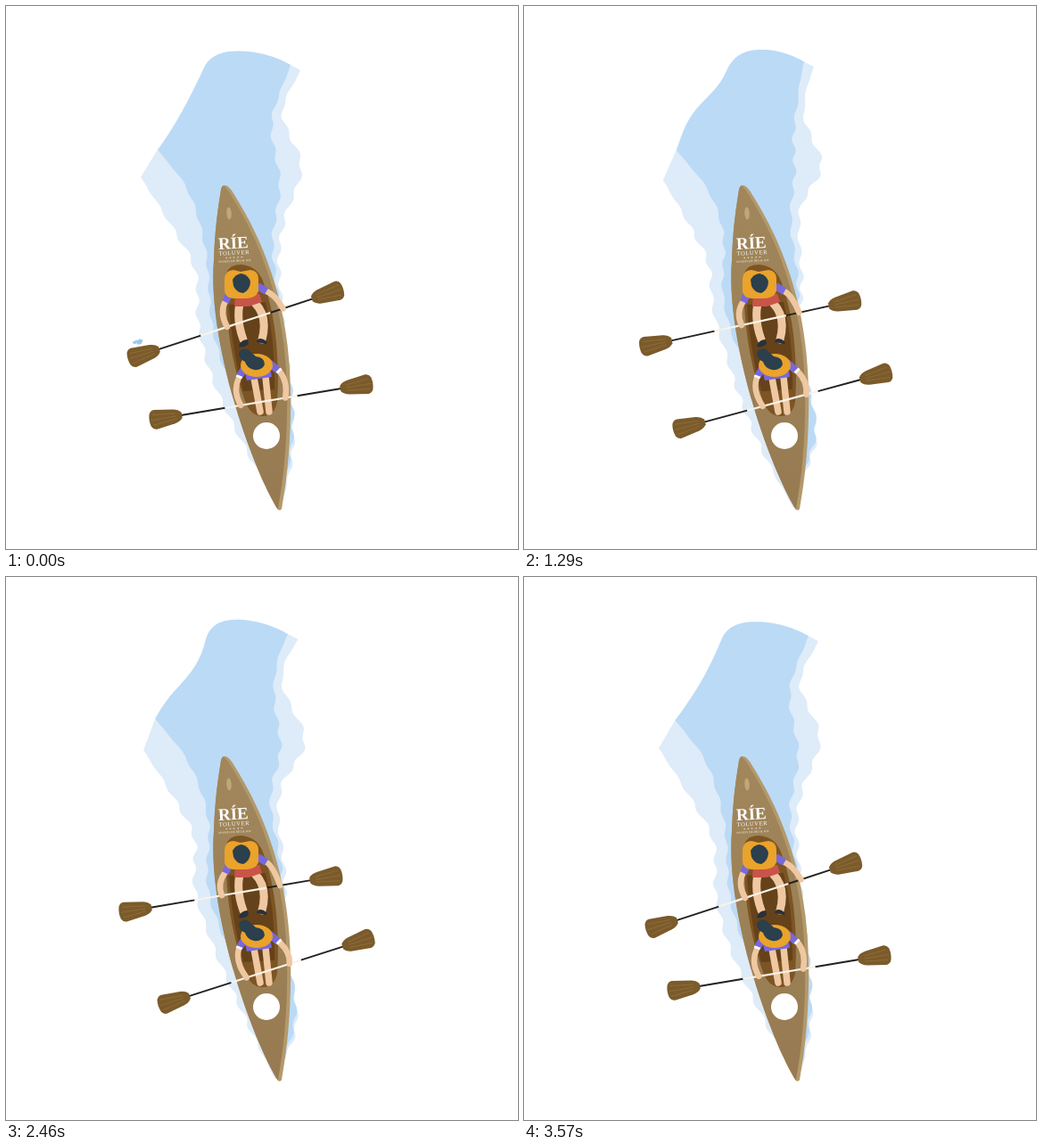
Animation, 574 px wide and 609 px high, one loop 3.6 s. Source, as an HTML page:

```html
<!DOCTYPE html>
<html lang="es">
<head>
<meta charset="utf-8">
<title>Kayak</title>
<style>
html, body { margin: 0; width: 100%; height: 100%; overflow: hidden; background: #fff; }
svg { display: block; width: 574px; height: 609px; }
.skin { fill: none; stroke: #efc8a2; stroke-linecap: round; }
.sleeve { fill: none; stroke: #7868de; stroke-width: 8; }
.cuff { fill: none; stroke: #fff; stroke-width: 7; }
.vest { fill: #eaa32b; }
.hair { fill: #2b3f4c; }
.logo { fill: #fff; text-anchor: middle; font-family: "Liberation Serif", serif; }
.grain { fill: none; stroke: #8d6c39; stroke-width: 1; }
</style>
</head>
<body>
<svg viewBox="0 0 574 609">
  <defs>
    <linearGradient id="wood" x1="0" y1="0" x2="0" y2="1">
      <stop offset="0" stop-color="#a1875b"/>
      <stop offset="1" stop-color="#977a51"/>
    </linearGradient>
    <path id="hull" d="M245 201Q249 201 253 207C300 280 322 360 319 460C318 505 314 535 309 564Q306 568 303 562C270 505 226 370 233 285C234 250 238 225 241 206Q242 201 245 201Z"/>
    <clipPath id="inside"><use href="#hull"/></clipPath>
    <g id="blade">
      <path d="M90-3Q93-7 99-8L120-11Q124-11 126-7Q128 0 126 7Q124 11 120 11L99 8Q93 7 90 3Z" fill="#7b5b2b"/>
      <path class="grain" d="M97-3L123-6M97 0H125M97 3L123 6"/>
    </g>
    <g id="paddle">
      <path d="M-91 0H-41M41 0H91" stroke="#23211f" stroke-width="1.900"/>
      <path d="M-41 0H41" stroke="#f8f2ea" stroke-width="2.200"/>
      <use href="#blade"/>
      <use href="#blade" transform="scale(-1 1)"/>
    </g>
  </defs>

  <path id="foam" fill="#deebf8"/>
  <path id="water" fill="#bbdaf6"/>
  <g id="splashes" fill="#9cc8ee"></g>

  <use href="#hull" fill="#b3996b"/>
  <g clip-path="url(#inside)"><use href="#hull" x="-4" fill="url(#wood)"/></g>
  <ellipse cx="250" cy="232.500" rx="2.700" ry="7" transform="rotate(-4 250 232)" fill="#bea878"/>

  <path d="M246 304Q248 290 263 290Q280 291 287 306C303 345 307 400 304 444Q301 460 288 460Q274 460 268 443C252 400 246 350 246 304Z" fill="#7d5423"/>
  <path d="M250 335L291 332Q302 375 301 430L266 432Q254 390 250 335Z" fill="#65421a"/>

  <g class="logo" transform="rotate(-3 255 270)">
    <text x="255" y="272" font-size="19" font-weight="bold">RÍE</text>
    <text x="255.500" y="279" font-size="6.500" letter-spacing=".6">TOLUVER</text>
    <text x="256" y="284.500" font-size="5" letter-spacing="1.800">*****</text>
    <text x="256" y="287" font-size="3.200" letter-spacing=".2">PASEOS DE RÍO &amp; SOL</text>
  </g>
  <circle cx="292" cy="482" r="15" fill="#fff"/>

  <g class="skin" stroke-width="7.500">
    <path d="M262 334Q258 352 266 374M279 333Q294 348 287 374" stroke-width="9"/>
    <path d="M278 417L285 455M291 416L295 455"/>
  </g>
  <path d="M261 382Q263 374 271 374L272 379Q266 384 261 382ZM281 377Q282 371 289 374Q294 377 292 379Z" fill="#29313c"/>
  <path d="M257 324L284 323L287 332L272 337L256 337Z" fill="#c9544a"/>
  <path d="M268 412L297 410L298 416L270 420Z" fill="#7868de"/>

  <use id="front" href="#paddle"/>
  <use id="rear" href="#paddle"/>
  <g id="arms" class="skin" stroke-width="6.500"></g>

  <path class="sleeve" d="M251 321L246 332M282 314L292 320"/>
  <path class="vest" d="M245 306Q246 296 255 296L263 298L274 296Q283 297 283 306V320Q280 328 268 328H255Q246 327 245 320Z"/>
  <path class="hair" d="M254 307Q257 301 264 300Q272 302 274 309Q274 318 266 322Q258 321 255 314Z"/>

  <path class="sleeve" d="M268 405L262 415M295 400L305 409"/>
  <path class="cuff" d="M262 414.500L261 417M305 408L307 410"/>
  <ellipse class="vest" cx="281" cy="403" rx="18" ry="13"/>
  <path class="hair" d="M261 389Q264 383 271 385L280 393Q290 394 290 402Q287 409 278 408Q270 406 268 399Q261 396 261 389Z"/>
</svg>
<script>
const $ = id => document.getElementById(id);
const { sin, cos, min, max, PI, hypot } = Math;
const TAU = PI * 2, LOOP = 3600, STROKE = 1800, RIPPLE = 900;
const WAVE = { x: -1.6, y: 2.2, size: 3.2 }; // degrees of lag per pixel

function make(parent, tag) {
  const el = document.createElementNS('http://www.w3.org/2000/svg', tag);
  return $(parent).appendChild(el);
}
const fmt = p => p[0].toFixed(2) + ' ' + p[1].toFixed(2);

// Smooth edge through keys [x, y] running downwards, with scallops across it.
function bank(keys, amp, phase) {
  const at = i => keys[max(0, min(keys.length - 1, i))];
  const slope = i => (at(i + 1)[0] - at(i - 1)[0]) / (at(i + 1)[1] - at(i - 1)[1]);
  const top = keys[0][1], bottom = at(keys.length)[1], points = [];
  for (let i = 0; i < keys.length - 1; i++) {
    const [x0, y0] = keys[i], [x1, y1] = keys[i + 1], h = y1 - y0;
    for (let y = y0; y < y1; y += 3) {
      const u = (y - y0) / h, v = 1 - u;
      const x = v * v * (1 + 2 * u) * x0 + u * u * (1 + 2 * v) * x1
        + h * u * v * (v * slope(i) - u * slope(i + 1));
      const fade = min(1, (y - top) / 60, (bottom - y) / 60);
      points.push([x + amp * fade * sin(TAU * y / 27 + phase), y]);
    }
  }
  return [...points, at(keys.length)];
}

function quad(a, c, b) {
  return Array.from({ length: 16 }, (_, i) => {
    const u = i / 15, v = 1 - u;
    return [0, 1].map(k => v * v * a[k] + 2 * u * v * c[k] + u * u * b[k]);
  });
}

const corner = [170, 161], shoulder = [222, 69], crest = [262, 50.5], stern = [319, 66];
const bow = [309, 563];
const foam = [
  corner,
  ...bank([[151, 192], [185, 246], [212, 296], [216, 360], [237, 432], [305, 565]], 2.2, 0),
  ...bank([[330, 72], [310, 120], [331, 180], [312, 240], [306, 290], [322, 490], bow], 2.2, 1).reverse(),
  stern
];
const water = [
  ...quad(corner, [195, 128], shoulder),
  ...quad(shoulder, [231, 50], crest),
  ...quad(crest, [292, 51], stern),
  ...bank([stern, [298, 130], [307, 200], [299, 270], [322, 460], bow], 1.8, 2),
  ...bank([corner, [203, 205], [223, 270], [236, 380], bow], 1.4, 0).reverse()
];

// Travelling wave that shears the water across its direction.
function warp([x, y], t) {
  const lag = (WAVE.y * (y - 72) + WAVE.x * (x - 327)) * PI / 180;
  const d = WAVE.size * (cos(TAU * t / RIPPLE - lag) - cos(lag)) / hypot(WAVE.x, WAVE.y);
  return [x + d * WAVE.y, y - d * WAVE.x];
}
const outline = (points, t) => 'M' + points.map(p => fmt(warp(p, t))).join('L') + 'Z';

// Centre, its drift, tilt and swing; each arm has a shoulder, an elbow and a grip along the shaft.
const oars = [
  { el: $('front'), x: 254.2, y: 356, dx: 3.2, dy: 0.8, tilt: -13.2, swing: -5,
    arms: [[[246, 331], [239, 344], -10], [[292, 320], [302, 324], 56]] },
  { el: $('rear'), x: 289.3, y: 443, dx: -3.3, dy: 1, tilt: -14.4, swing: 4.9,
    arms: [[[261, 417], [254, 432], -23], [[307, 410], [316, 421], 27.5]] }
];
oars.forEach(o => o.arms.forEach(a => a.push(make('arms', 'path'))));

function row(o, c) {
  const x = o.x + o.dx * c, y = o.y + o.dy * c, deg = o.tilt + o.swing * c;
  const rad = deg * PI / 180;
  o.el.setAttribute('transform', `translate(${x} ${y}) rotate(${deg})`);
  for (const [from, elbow, grip, el] of o.arms) {
    const hand = [x + grip * cos(rad), y + grip * sin(rad)];
    const bend = [elbow[0] + o.dx * (c - 1) / 2, elbow[1]];
    el.setAttribute('d', `M${fmt(from)}Q${fmt(bend)} ${fmt(hand)}`);
  }
}

const rand = n => { const v = sin(n * 91.7) * 4373.3; return v - Math.floor(v); };
const splashes = [
  { x: 146, y: 378, start: 1775, span: 520, size: 3.4 },
  { x: 348, y: 333, start: 785, span: 545, size: 3.4 },
  { x: 180, y: 464, start: 860, span: 490, size: 1.4 },
  { x: 400, y: 411, start: 110, span: 460, size: 1.4 }
];
splashes.forEach(s => s.drops = Array.from({ length: 12 }, () => make('splashes', 'path')));

function spray(s, t) {
  const p = ((t - s.start + STROKE) % STROKE) / s.span;
  s.drops.forEach((el, i) => {
    const a = rand(i + 1), b = rand(i + 21);
    const r = p < 1 ? s.size * (0.4 + a) * min(1, 0.5 + 2 * p) * (1 - p) : 0;
    const x = s.x + 20 * p + (a - 0.5) * (8 + 24 * p);
    const y = s.y - 22 * sin(min(p, 1) * 2.3) * (0.1 + b * 0.9);
    el.setAttribute('d', r ? `M${x - r} ${y + r}L${x - r * 0.3} ${y - r}L${x + r} ${y - r * 0.7}L${x + r * 0.6} ${y + r}Z` : '');
  });
}

function draw(t) {
  $('foam').setAttribute('d', outline(foam, t));
  $('water').setAttribute('d', outline(water, t));
  const c = cos(TAU * (t + 15) / STROKE);
  oars.forEach(o => row(o, c));
  splashes.forEach(s => spray(s, t));
}

const begin = performance.now();
function tick() {
  const t = (performance.now() - begin) % LOOP;
  draw(Math.floor(t / 30) * 30);
  requestAnimationFrame(tick);
}
tick();
</script>
</body>
</html>
```
